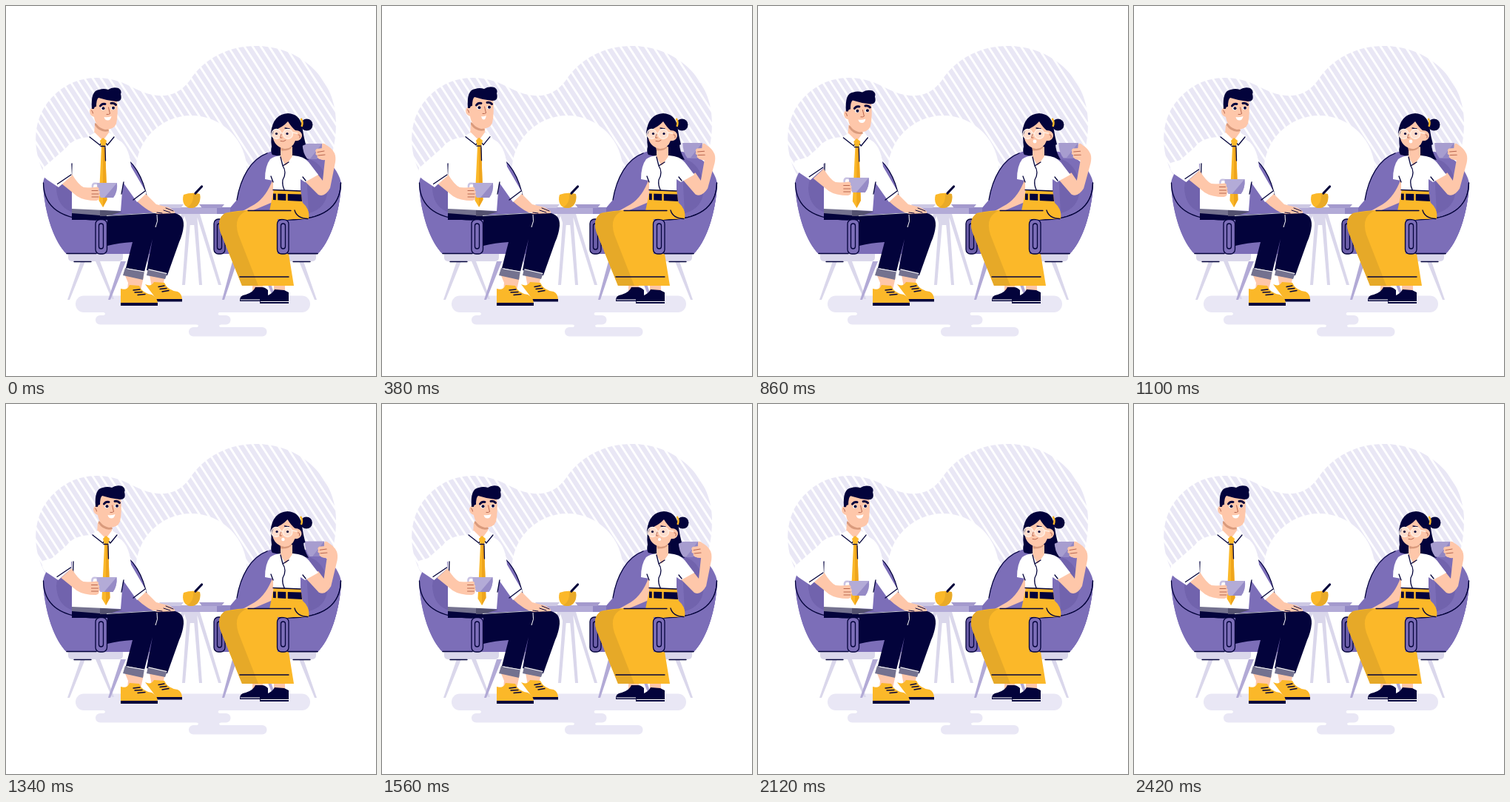
Recreate the animation shown at these times as an HTML page. Size 500x500 px, loop 2440 ms.

```html
<!DOCTYPE html>
<html lang="en">
<head>
<meta charset="utf-8">
<title>Coffee break</title>
<style>
  html, body { margin: 0; width: 100%; height: 100%; overflow: hidden; background: #fff; }
  svg { display: block; width: 100%; height: 100%; }
  .skin { fill: #fec7aa; }
  .shade { fill: #d99a7c; }
  .navy { fill: #03033b; }
  .gold { fill: #fbb829; }
  .white { fill: #fff; }
  .pale { fill: #e9e7f5; }
  .chair { fill: #7c6eb8; }
  .line { fill: none; stroke: #03033b; stroke-width: 1.3; stroke-linecap: round; stroke-linejoin: round; }
  .fine { fill: none; stroke: #b8664f; stroke-width: 1; stroke-linecap: round; }
  .leg { fill: #dad7eb; }
</style>
</head>
<body>
<svg viewBox="0 0 500 500">
  <defs>
    <pattern id="stripes" width="9.3" height="20" patternUnits="userSpaceOnUse" patternTransform="rotate(-33)">
      <rect class="pale" width="6.500" height="20"/>
    </pattern>
    <g id="armrest">
      <path class="chair" d="M50 240C52 272 74 289 122 289H136V335H82C66 320 52 282 50 240Z"/>
      <path class="line" d="M50.500 239C51 271 74 289 122 289M82 334.500H122"/>
      <rect class="line" x="121" y="288.500" width="15.500" height="46.500" rx="6" style="fill:#7c6eb8"/>
      <rect class="line" x="125.500" y="294" width="6" height="34" rx="3"/>
    </g>
    <g id="chair">
      <path class="leg" d="M101 345H107L86 397H83ZM121 345H127L146 396H143Z"/>
      <path d="M155 345H162L141 397H138ZM187 334H194L211 397H208Z" fill="#b2aad6"/>
      <path class="leg" d="M84 334H158V340Q158 345 152 345H90Q84 345 84 340Z"/>
      <path class="line" d="M92 345.500H115"/>
      <path class="chair" d="M50 240C52 224 70 198 105 196H140C172 200 186 232 191 262L215 290V335H82C66 320 52 282 50 240Z"/>
      <path d="M68 246C70 222 82 208 98 206L94 280C78 276 69 266 68 246Z" fill="#7163ad"/>
      <path class="line" d="M150 199C172 207 186 232 191 262"/>
      <rect class="line" x="207" y="288" width="15" height="47" rx="6" style="fill:#6c5fa9"/>
      <rect class="line" x="211.500" y="294" width="6" height="35" rx="3"/>
      <use href="#armrest"/>
    </g>
  </defs>

  <path d="M51 225C36 195 36 158 55 132C83 94 129 88 169 109C203 127 229 126 248 101C268 70 302 53 341 54C402 56 446 102 446 157C446 185 440 210 428 228L300 250H70Z" fill="url(#stripes)"/>
  <circle class="white" cx="250.500" cy="223" r="75"/>
  <g class="pale">
    <rect x="94" y="391.500" width="317" height="22.500" rx="11.200"/>
    <rect x="121" y="418" width="182.500" height="12.500" rx="6.200"/>
    <rect x="247" y="434" width="105.500" height="12.500" rx="6.200"/>
    <path d="M130 413H290Q283 416 290 419H130Q138 416 130 413ZM257 430H291Q285 432 291 435H257Q263 432 257 430Z"/>
  </g>

  <path class="leg" d="M237 281H242L216 360H212ZM245 281H250L242 377H238ZM253 281H258L265 377H261ZM257 281H262L291 377H287Z"/>
  <path class="leg" d="M240 280H260L256 296H245Z"/>
  <use href="#chair"/>
  <use href="#chair" transform="matrix(-1 0 0 1 503 0)"/>
  <path d="M200 272H303V281H200Z" fill="#b3abd7"/>
  <path d="M285 272H303V281H285Z" fill="#9288c4"/>
  <path d="M207 268H240L236 273H211Z" fill="#cdc8e3"/>
  <path d="M261 268H295L291 273H265Z" fill="#a49acd"/>
  <path class="gold" d="M240 255Q251 251 262 254C264 266 258 273 250 273C241 273 237 264 240 255Z"/>
  <path d="M262 254C264 266 258 273 250 273Q247 273 245 272Q254 267 253 254Z" fill="#e9aa28"/>
  <path class="line" d="M256 253L264.500 244" style="stroke-width:3.200"/>

  <g id="man">
    <path class="skin" d="M160 362L186 366L182 384H164L165 374ZM193 358L215 362L212 380H197Z"/>
    <path class="gold" d="M188 376Q196 380 200 373L214 374Q218 384 232 386Q238 389 238 397H204Z"/>
    <path class="navy" d="M203 396H238V399.500H203Z"/>
    <path class="line" d="M206 379.500L214 378M208 382.500L217 381.500M211 386L220 384.500"/>
    <path class="gold" d="M155 382Q164 385 167 377L180 378Q184 388 197 390Q205 394 205 402H155Z"/>
    <path class="navy" d="M155 401H205V405H155Z"/>
    <path class="line" d="M172 384L181 383M174 387L184 386.500M178 390.500L188 389.500"/>
    <path class="navy" d="M89 277L130 283L205 279H224Q241 281 240 297Q239 308 234 319L218 364L190 357L198 315L187 359L162 354L171 319Q153 320 137 324V289H89Z"/>
    <path d="M161 354L187 358.500L185 370L158 364ZM192 355L218 361L215 369L190 364Z" fill="#74728f"/>
    <path d="M164 355L187 359M193 356L217 361.500M204 282Q206 291 202 299" fill="none" stroke="#fff" stroke-width="1"/>
    <path d="M89 273H127V283L89 280Z" fill="#74728f"/>
    <path d="M127 275L157 278L136 284H127Z" fill="#53516f"/>

    <path class="skin" d="M176 263L188 253L203 268L219 272Q230 277 228 280L205 281Q193 279 176 263Z"/>
    <path class="line" d="M204 279L211 280M213 276L222 279M216 273L226 277" style="stroke-width:1"/>
    <path class="white" d="M114 177Q91 178 82 191L50 219L56 224L89 213V274L155 277L158 238L177 265L190 253L169 217Q166 185 148 179Z"/>
    <path id="seam" class="line" d="M89 213L88.500 230"/>
    <path class="line" d="M159 238L156 254M172 262L188 250"/>
    <path d="M136 283.500L203 279.500" stroke="#fff" stroke-width=".8"/>

    <g id="tie">
      <path class="skin" d="M120 160H139V175L131 183L119 174Z"/>
      <path class="white" d="M113 175L120 171L131 182L126 189ZM139 171L149 177L137 189L131 182Z"/>
      <path class="line" d="M113 177L127 188L131 181L137 188L146 177"/>
      <path class="gold" d="M127 182L131 178L136 182L134 190L136.500 262L131 272L125.500 263L129 190Z"/>
      <path d="M131 190L134 190L136.500 262L131 272Z" fill="#efa51c"/>
      <path class="line" d="M128 189.500H134M134 191L134.500 209"/>
    </g>

    <g id="manHead">
      <path class="shade" d="M120 158L138 166L139 169Q127 172 120 161Z"/>
      <path class="skin" d="M119 124H150Q152 146 149 159Q146 167 134 167Q121 164 119 150Q113 148 113 142Q114 137 119 138Z"/>
      <path class="navy" d="M116 139Q114 114 126 113Q132 111 138 113Q144 109 152 111Q157 114 155 119Q158 129 149 129Q137 128 125 124Q122 126 122 136Q119 136 119 139Z"/>
      <path class="line" d="M127.500 135Q130 131.500 134 132.500M142 131.500Q146 130.500 148.500 133.500" style="stroke-width:3"/>
      <ellipse class="white" cx="131" cy="138.500" rx="2.800" ry="2.200"/>
      <ellipse class="white" cx="144.500" cy="138" rx="2.800" ry="2.200"/>
      <circle class="navy" cx="131.500" cy="138.300" r="2"/>
      <circle class="navy" cx="145" cy="137.800" r="2"/>
      <path class="fine" d="M138.500 137L140.500 145.500Q139 147 136 146.500M115.500 141Q117 141 117.500 145"/>
      <path id="grin" class="white" d="M-5 -1.500Q0 -.5 5 -2.500Q4 3 0 3Q-4 3 -5 -1.500Z"/>
    </g>

    <g id="manArm">
      <path class="skin" d="M75 240L89 227Q98 242 105 245L118 246Q127 248 127 254L122 263Q105 263 96 257Z"/>
      <path d="M126 241Q116 237 117 245Q119 252 126 252" fill="none" stroke="#c9c3e3" stroke-width="2.500"/>
      <path d="M123 239H150Q151 251 145 259H128Q123 252 123 239Z" fill="#b3abd7"/>
      <path d="M150 239Q151 251 145 259H133Z" fill="#968bc6"/>
      <path class="skin" d="M110 246L123 244.500Q127 246 125 249Q128 250 126 253.500Q128 255 126 258Q127 262 122 263L110 261.500Z"/>
      <path class="fine" d="M116 249.500H124M116 254H125M116 258H125"/>
    </g>
    <g id="manSleeve">
      <path class="white" d="M50 219L88 208L89 229L71 245L56 235Q47 229 50 219Z"/>
      <path class="line" d="M69.500 240.500L88 228"/>
    </g>
  </g>

  <g id="woman">
    <path class="skin" d="M333 373H347V385H333ZM362 374H377V388H362Z"/>
    <path class="navy" d="M316 399Q315 391 324 390Q334 387 337 380H346Q350 380 354 384V399ZM343 402Q342 393 352 392Q361 388 363 383L376 384L382 387V402Z"/>
    <path d="M317 397H343M344 399.500H382" stroke="#fff" stroke-width="1"/>
    <path class="skin" d="M361 233H374V246Q370 262 358 266L332 277H320L336 268Q352 258 361 233Z"/>
    <path class="gold" d="M362 248H398L401 268Q411 274 409 288H367V335H382L389 378H319L290 306Q284 288 296 280Q320 274 356 277Z"/>
    <path d="M319 378L290 306Q284 288 296 280L328 276Q306 282 314 309L341 378Z" fill="#e6a928"/>
    <path class="line" d="M316 366H382"/>
    <use href="#armrest" transform="matrix(-1 0 0 1 503 0)"/>
    <path class="gold" d="M362 263L400 265Q411 274 409 288Q391 287 380 289L362 285Z"/>
    <path class="line" d="M327 276.500H385M390 276Q393 287 408 287.500"/>
    <path class="navy" d="M361 253.500L399 254.500L400 264L361 262Z"/>
    <path d="M366 252V263M379.500 253V264" stroke="#fbb829" stroke-width="2.500"/>

    <path class="navy" d="M361 166Q357 178 359 190Q357 197 360 201L374 204H390L409 208Q402 196 402 186Q400 176 397 165Z"/>
    <g id="womanArm">
      <path class="skin" d="M404 237L420 226L428 236L431 208Q423 209 420 202L424 188L431 187Q440 191 444 199Q446 204 445 211L438 246Q431 259 422 255Z"/>
      <g id="womanCup">
        <path d="M400.500 186H427Q427 200 420 206.500H407Q401 199 400.500 186Z" fill="#a79dcf"/>
        <path d="M427 186Q427 200 420 206.500H411Z" fill="#9186c3"/>
      </g>
      <path class="skin" d="M427 186Q431 185 433 189L436 206L424 207Q419 205 421 202Q417 201 419 198Q417 195 420 193L428 192Z"/>
      <path class="fine" d="M421 197.500L430 196M422 202L431 201"/>
    </g>
    <path class="white" d="M357 207Q362 203 371 202H388Q403 203 409 211L422 228L404 238L398 234V250L361 248L361 236L350 234Q350 216 357 207Z"/>
    <path class="skin" d="M371 190H387V203L378 216L371 204Z"/>
    <path class="line" d="M371 204L374 216Q380 225 374 235Q373 242 376 248M374 216L382 211M358 230L361 238M401 231L405 236M361 248.500L398 250"/>

    <g id="womanHead">
      <path class="shade" d="M371 191L387 190Q384 196 372 195.500Z"/>
      <circle class="navy" cx="406.500" cy="160.500" r="8"/>
      <path class="navy" d="M358 171Q361 146 381 145Q397 146 400 162Q402 176 405 187L393 192L360 182Z"/>
      <path class="skin" d="M362 168Q374 164 381 156Q386 164 391 168Q400 168 400 176Q398 183 391 182Q387 193 377 193Q362 191 360 174Z"/>
      <path d="M398.500 152Q402 157 399.500 163" fill="none" stroke="#fbb829" stroke-width="2.500"/>
      <path class="line" d="M363 165.500L368 164.500M377 165L383 166"/>
      <g fill="#fff" fill-opacity=".4" stroke="#fff0e4" stroke-width="1.300">
        <circle cx="365.500" cy="173" r="6.500"/><circle cx="381" cy="173" r="6.500"/>
        <path d="M372 172H375M387 171L394 172" fill="none"/>
      </g>
      <g id="pupils" class="navy"><circle cx="365.500" cy="172.500" r="1.600"/><circle cx="380" cy="172.500" r="1.600"/></g>
      <path class="fine" d="M372 173L370.500 178H373M395 174Q398 173 397 178"/>
      <path id="smile" class="fine" d="M371 182.500Q375 184 378 181.500"/>
      <ellipse id="gasp" class="white" rx="2.500" ry="2.500"/>
    </g>
  </g>
</svg>
<script>
  const LOOP = 2440;
  const part = id => document.getElementById(id);
  const move = (id, transform) => part(id).setAttribute('transform', transform);

  // Eased value through [time, value] keys.
  function track(t, ...keys) {
    if (t <= keys[0][0]) return keys[0][1];
    for (let i = 1; i < keys.length; i++) {
      const [t0, a] = keys[i - 1], [t1, b] = keys[i];
      if (t < t1) {
        const u = (t - t0) / (t1 - t0);
        return a + (b - a) * u * u * (3 - 2 * u);
      }
    }
    return keys[keys.length - 1][1];
  }

  function draw(now) {
    const t = now % LOOP;
    const sway = track(t, [560, 0], [1100, 1], [1560, 1], [2160, 0]);
    const nod = track(t, [0, 0], [380, -1], [560, -.5], [840, 3.5], [1100, 0], [1560, 0], [1860, 4], [2160, 0]);
    const lift = track(t, [450, 0], [850, -7], [1100, -5], [1560, -5], [1860, 0]);
    const sip = track(t, [60, 0], [380, 1], [1120, 1], [1600, 0]);
    const grin = track(t, [0, 1], [380, .65], [620, 1]);
    const gasp = track(t, [450, 0], [800, 1], [1850, .8], [2100, 0]);

    move('manHead', `translate(${5 * sway} ${nod})`);
    move('tie', `translate(${4 * sway} ${nod * .3})`);
    move('seam', `translate(${2 * sway} 0)`);
    move('manArm', `translate(${-.5 * sway} ${lift})`);
    move('manSleeve', `translate(${-.5 * sway} ${lift * 1.4})`);
    move('grin', `translate(137.500 151.500) scale(${grin} 1)`);
    move('womanArm', `translate(${1.5 * sip} 0) rotate(${4 * sip} 430 255)`);
    move('womanCup', `rotate(${-4 * sip} 414 196)`);
    move('womanHead', `translate(${-sip} 0)`);
    move('pupils', `translate(${2 * sip} 0)`);
    move('gasp', `translate(375 183) scale(${gasp})`);
    part('smile').style.opacity = 1 - gasp;
    requestAnimationFrame(() => draw(performance.now()));
  }
  draw(0);
</script>
</body>
</html>
```
